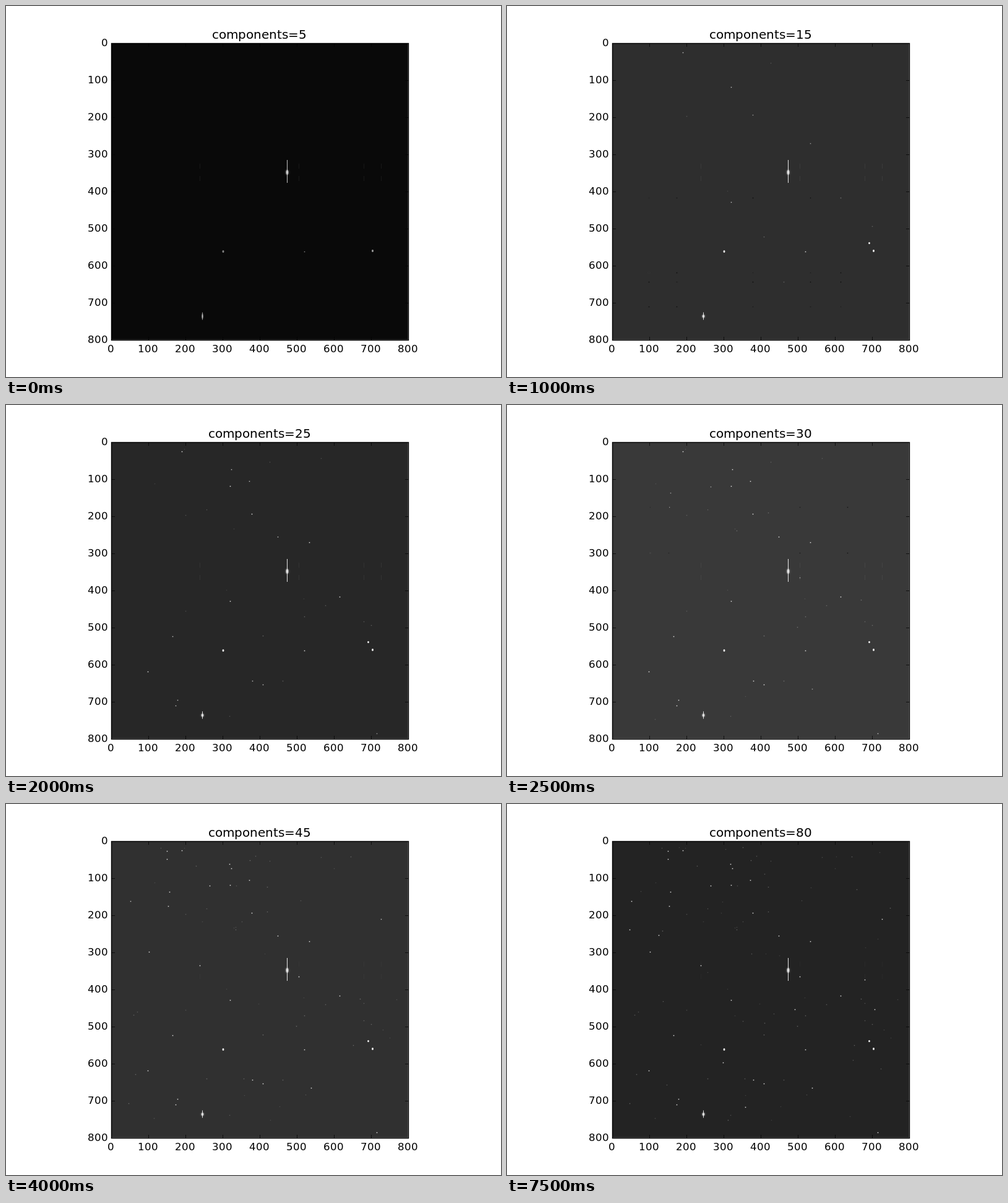
Write an HTML page with a canvas that moves like this. It is 800x600 px and loops after 8 s.

```html
<!DOCTYPE html>
<html lang="en">
<head>
<meta charset="utf-8">
<title>Components</title>
<style>
  html, body { margin: 0; width: 100%; height: 100%; overflow: hidden; background: #fff; }
  canvas { display: block; width: 800px; height: 600px; }
</style>
</head>
<body>
<canvas id="stage" width="800" height="600"></canvas>
<script>
const ctx = document.getElementById('stage').getContext('2d');
const STEP = 500;
const LEFT = 170, TOP = 60, SIZE = 480;

// Sky grey for components = 5, 10, ... 80
const sky = [9, 16, 46, 52, 39, 57, 47, 49, 48, 47, 46, 44, 43, 40, 38, 35];

// Main stars as [x, y], by the number of components that brings them out
const stars = {
  5: [[482, 397]],
  10: [[284, 75], [362, 131], [362, 317]],
  15: [[397, 176], [490, 222], [539, 310], [229, 431]],
  20: [[398, 446], [364, 104], [393, 123], [439, 213], [269, 374], [277, 477], [274, 486], [415, 452]],
  25: [[599, 531]],
  30: [[264, 142], [329, 132], [262, 165], [473, 279], [493, 459], [231, 239]],
  35: [[313, 261], [260, 89], [361, 97], [260, 76]],
  40: [[201, 157], [606, 186]],
  50: [[349, 418], [245, 212], [578, 284]],
  55: [[465, 332], [594, 332]],
  60: [[385, 490]],
  70: [[198, 203]]
};

// Dark points stand where these columns and rows cross
const early = { cols: [229, 274, 397, 490, 539], rows: [310, 431, 446, 486] };
const shadows = { 15: early, 20: early, 30: { cols: [231, 261, 473, 550], rows: [165, 239] } };

function seeded(seed) {
  return () => (seed = seed * 16807 % 2147483647) / 2147483647;
}

const rnd = seeded(4127);
const faint = Array.from({ length: 80 }, () => ({
  x: Math.floor(LEFT + 25 + rnd() * (SIZE - 40)),
  y: Math.floor(TOP + 10 + rnd() ** 1.3 * (SIZE - 30)),
  from: 10 + rnd() * 65,
  light: .08 + .16 * rnd()
}));

function tone(v) {
  ctx.fillStyle = v < 0 ? `rgba(0,0,0,${-v})` : `rgba(255,255,255,${v})`;
}

function dot(x, y, v) {
  tone(v * .45);
  ctx.fillRect(x - .5, y - .4, 2, 1.8);
  tone(v);
  ctx.fillRect(x, y, 1, 1);
}

function oval(x, y, rx, ry, v) {
  tone(v);
  ctx.beginPath();
  ctx.ellipse(x, y, rx, ry, 0, 0, Math.PI * 2);
  ctx.fill();
}

// A star with a halo and an upright spike
function flare(x, y, rx, ry, top, bottom, v) {
  tone(v);
  ctx.fillRect(x - .5, top, 1, bottom - top);
  oval(x, y, rx * 2, ry * 1.5, .05);
  oval(x, y, rx, ry, v * .65);
  oval(x, y, rx * .6, ry * .6, v * .6);
}

function drawStars(n) {
  for (const s of faint) if (n >= s.from) dot(s.x, s.y, s.light);

  for (const from in stars) {
    const age = n - from;
    if (age < 0) continue;
    for (const [x, y] of stars[from]) dot(x, y, Math.min(.85, .45 + age * .04));
  }

  if (shadows[n]) {
    const { cols, rows } = shadows[n];
    const dark = seeded(n < 30 ? 91 : 57);
    for (const x of cols) for (const y of rows) dot(x, y, -.2 - .6 * dark());
  }

  // Faint upright streaks above and below the large star's row
  tone(n < 35 ? .06 : .03);
  for (const x of [313, 473, 578, 606]) {
    for (const side of [-1, 1]) ctx.fillRect(x, 265 + side * 10, 1, 8);
  }

  const first = n === 5;
  oval(351, 397, 1.5, 2, first ? .5 : .9);
  oval(592.5, 396, 1.5, 2, first ? .6 : .9);
  if (!first) oval(585.5, 383.5, 1.4, 1.7, .9);
  flare(454.5, 269, 2.4, 4, 249, 286, first ? .75 : .88);
  flare(317.5, 501.8, first ? 1.3 : 2.3, first ? 4 : 2.7, 495.5, 507.5, first ? .55 : .85);
}

// Text set on whole pixels; align is 0 for left, .5 for centre, 1 for right
function label(text, x, y, size, align) {
  ctx.fillStyle = '#000';
  ctx.font = `${size}px "DejaVu Sans", sans-serif`;
  const chars = [...String(text)];
  const widths = chars.map(c => Math.round(ctx.measureText(c).width));
  const total = widths.reduce((a, b) => a + b, 0);
  let pen = Math.floor(x - total * align);
  chars.forEach((c, i) => {
    ctx.fillText(c, pen, y);
    pen += widths[i];
  });
}

function drawAxes() {
  const right = LEFT + SIZE + .5, bottom = TOP + SIZE + .5;
  ctx.strokeStyle = '#000';
  ctx.lineWidth = .7;
  ctx.beginPath();
  for (let d = 0; d <= SIZE; d += 60) {
    const x = LEFT + d + .5, y = TOP + d + .5;
    ctx.moveTo(x, TOP + .5); ctx.lineTo(x, TOP + 6);
    ctx.moveTo(x, bottom); ctx.lineTo(x, bottom - 5.5);
    ctx.moveTo(LEFT + .5, y); ctx.lineTo(LEFT + 6, y);
    ctx.moveTo(right, y); ctx.lineTo(right - 5.5, y);
  }
  ctx.stroke();
  ctx.lineWidth = 1.39;
  ctx.strokeRect(LEFT + .5, TOP + .5, SIZE, SIZE);

  for (let i = 0; i <= 8; i++) {
    label(i * 100, LEFT + i * 60, 560, 16.67, .5);
    label(i * 100, 165, 65 + i * 60, 16.67, 1);
  }
}

function draw(now) {
  const k = Math.floor(now / STEP) % sky.length;
  const n = (k + 1) * 5;
  ctx.fillStyle = '#fff';
  ctx.fillRect(0, 0, 800, 600);
  ctx.fillStyle = `rgb(${sky[k]},${sky[k]},${sky[k]})`;
  ctx.fillRect(LEFT, TOP, SIZE - .25, SIZE - .25);
  drawStars(n);
  drawAxes();
  label('components=' + n, 410, 53, 20, .5);
}

let start = null;
function tick(now) {
  if (start === null) start = now;
  draw(now - start);
  requestAnimationFrame(tick);
}
draw(0);
requestAnimationFrame(tick);
</script>
</body>
</html>
```
